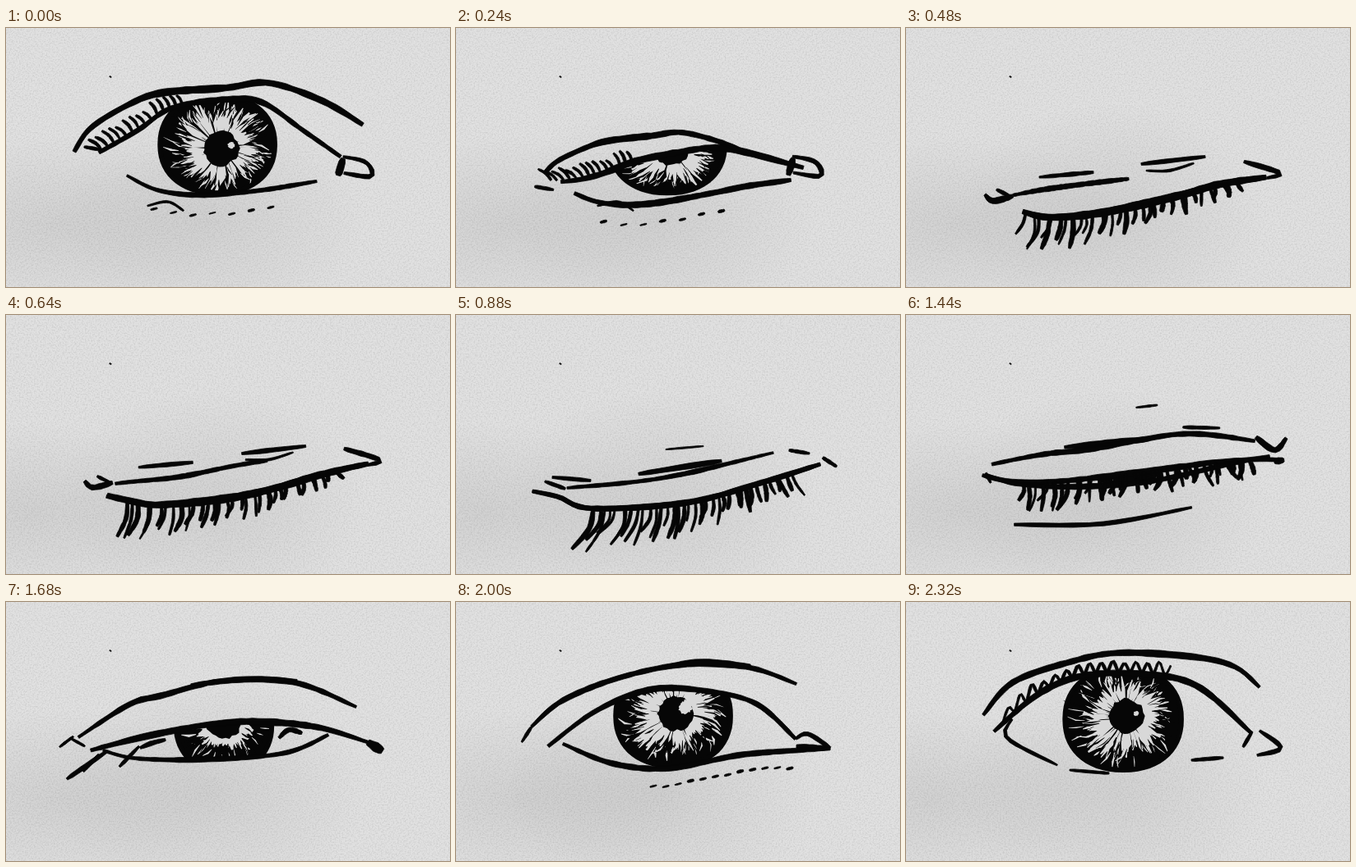
Write an HTML page that moves like this. It is 540 px wide and 316 px high and loops after 2.4 s.

```html
<!DOCTYPE html>
<html lang="en">
<head>
<meta charset="utf-8">
<title>Blinking eye</title>
<style>
html, body { margin: 0; width: 100%; height: 100%; overflow: hidden; background: #dedede; }
svg { display: block; width: 100vw; height: 100vh; }
</style>
</head>
<body>
<svg viewBox="0 0 540 316" preserveAspectRatio="none">
  <defs>
    <radialGradient id="shade"><stop stop-color="#000" stop-opacity=".07"/><stop offset="1" stop-color="#000" stop-opacity="0"/></radialGradient>
    <filter id="grain" x="0" y="0" width="100%" height="100%" color-interpolation-filters="sRGB">
      <feTurbulence id="noise" type="fractalNoise" baseFrequency=".55" numOctaves="2"/>
      <feColorMatrix values="0 0 0 0 0  0 0 0 0 0  0 0 0 0 0  .2 0 0 0 -.08"/>
    </filter>
    <clipPath id="gap"><path id="gapPath"/></clipPath>
  </defs>
  <rect width="540" height="316" fill="#e1e1e1"/>
  <ellipse id="shadow" cx="60" cy="240" rx="210" ry="110" fill="url(#shade)"/>
  <ellipse cx="250" cy="230" rx="190" ry="140" fill="url(#shade)"/>
  <rect width="540" height="316" filter="url(#grain)"/>
  <g id="iris" clip-path="url(#gap)" fill="#060606">
    <path id="disc"/>
    <path id="light" fill="#d8d8d8"/>
    <path id="fibre"/>
    <path id="rim" fill="none" stroke="#060606" stroke-width="6"/>
    <path id="pupil"/>
    <path id="glint" fill="#d8d8d8"/>
  </g>
  <path id="ink" fill="#060606" stroke="#060606" stroke-width=".8" stroke-linejoin="round"/>
</svg>
<script>
const STEP = 80, FRAMES = 30, N = 48;
const $ = id => document.getElementById(id);
const setD = (id, d) => $(id).setAttribute("d", d);
const mix = (a, b, t) => a + (b - a) * t;

// w: widths of crease, lid and lower line.
// folds travel with the lid, corners stay; both are "width x,y x,y ...|width ...".
// lashes, hatch and dashes are grown along the lines by rule.
const poses = [
  { at: 0, ease: 1, w: [8, 6.5, 5.5],
    crease: "83,151 103,122 150,93 190,79 268,73 320,67 385,89 434,118",
    lid: "113,152 160,125 203,97 270,87 312,91 360,124 407,157",
    low: "147,180 185,198 240,204 310,198 378,187",
    iris: { x: 257, y: 142, rx: 72, ry: 61, px: 262, py: 147, glow: .55, axis: 1.3, glint: 4 },
    folds: "4 95,145 118,149",
    corners: "5 410,157 438,164 444,181 411,177|9 410,159 404,180|3 172,217 197,212 216,223",
    hatch: { from: 116, to: 214, n: 14, height: 14 },
    dashes: { from: 180, to: 322, n: 7, drop: 22 } },
  { at: 6, ease: 1, w: [6, 9, 9],
    crease: "130,204 168,197 220,190 271,184",
    lid: "142,224 175,231 240,225 330,205 380,191 438,182",
    folds: "5 162,182 228,176|5 286,166 364,157|3 292,174 320,174 350,165",
    corners: "7 96,203 106,211 130,205|4 110,197 126,205|6 411,163 455,177 439,183",
    lashes: { from: 144, to: 405, n: 32, len: [44, 15], lean: [-12, 6], zig: 5 } },
  { at: 11, ease: 1, w: [5, 6.5, 6.5],
    crease: "135,211 250,199 386,168",
    lid: "93,215 125,222 165,236 280,229 370,205 443,182",
    folds: "6 222,194 323,178|5 262,197 305,189|2 255,164 301,160",
    corners: "5 108,203 133,212|5 117,198 164,202|4 405,165 430,169|5 446,174 463,185",
    lashes: { from: 165, to: 412, n: 36, len: [50, 24], lean: [-22, 12], zig: 5 } },
  { at: 15, ease: 2, w: [6.5, 6.5, 6.5],
    crease: "110,189 220,182 285,171 340,162 424,163",
    lid: "90,200 130,213 200,216 300,206 400,184 458,177",
    folds: "7 193,172 240,167 297,162|3 280,124 306,121|4 337,148 382,149",
    corners: "4 97,192 103,204|7 425,149 448,165 462,150|8 448,179 460,177|5 132,255 240,254 348,234",
    lashes: { from: 140, to: 420, n: 40, len: [35, 23], lean: [-5, 5], zig: 11 } },
  { at: 21, ease: 1, w: [6.5, 7.5, 5.5],
    crease: "88,165 150,125 190,114 260,97 350,98 426,128",
    lid: "103,181 170,164 250,149 310,146 380,153 440,171",
    low: "118,181 160,191 250,192 340,184 392,162",
    iris: { x: 265, y: 150, rx: 60, ry: 58, px: 265, py: 146, glow: .25, axis: .2, glint: 2 },
    folds: "5 225,101 290,93 354,96|4 138,201 162,176|5 163,178 178,172 194,168|6 332,166 344,156 360,160",
    corners: "5 74,216 123,182|4 94,207 113,186|3 65,177 82,164|3 78,166 96,176|12 440,171 458,182" },
  { at: 25, ease: 1, w: [6.5, 6.5, 6.5],
    crease: "92,152 130,120 200,92 280,76 357,80 414,100",
    lid: "112,176 170,133 235,107 300,108 365,124 413,167",
    low: "130,173 190,197 260,203 350,186 455,179",
    iris: { x: 264, y: 139, rx: 72, ry: 63, px: 267, py: 136, glow: .45, axis: 2.3, glint: 8 },
    folds: "7 258,79 300,73 358,78",
    corners: "4 92,152 80,171|5 413,167 428,161 455,178|7 414,176 455,179",
    dashes: { from: 240, to: 406, n: 12, drop: 19 } },
  { at: 29, ease: 1, w: [7.5, 7.5, 0],
    crease: "94,138 130,98 200,73 260,62 350,67 400,79 430,104",
    lid: "107,158 160,113 215,90 290,88 355,103 420,160",
    low: "123,165 185,199 264,214 347,194 385,190",
    iris: { x: 264, y: 143, rx: 73, ry: 64, px: 268, py: 139, glow: .45, axis: 1.8, glint: 3 },
    folds: "",
    corners: "4 129,143 123,166 184,199|4 199,205 247,209|4 347,193 386,190|4 421,158 410,177|5 430,157 456,178 427,187",
    hatch: { from: 118, to: 322, n: 30, height: 13, zig: true } }
];

function rng(seed) {
  let s = seed * 7919 + 17;
  return () => {
    s = (s + 0x6D2B79F5) | 0;
    let r = Math.imul(s ^ s >>> 15, 1 | s);
    r ^= r + Math.imul(r ^ r >>> 7, 61 | r);
    return ((r ^ r >>> 14) >>> 0) / 4294967296;
  };
}

const points = s => s.split(" ").map(p => p.split(",").map(Number));
const strokes = s => s ? s.split("|").map(line => {
  const i = line.indexOf(" ");
  return { w: +line.slice(0, i), pts: points(line.slice(i + 1)) };
}) : [];

// Smooth curve through the points, sampled at equal distances.
function curve(p, n) {
  const dense = [];
  for (let i = 0; i < p.length - 1; i++) {
    const a = p[i - 1] || p[i], b = p[i], c = p[i + 1], d = p[i + 2] || c;
    for (let k = 0; k < 10; k++) {
      const t = k / 10;
      dense.push([0, 1].map(j => b[j] + t / 2 * (c[j] - a[j] +
        t * (2 * a[j] - 5 * b[j] + 4 * c[j] - d[j] + t * (3 * (b[j] - c[j]) + d[j] - a[j])))));
    }
  }
  dense.push(p[p.length - 1]);
  const len = [0];
  for (let i = 1; i < dense.length; i++)
    len.push(len[i - 1] + Math.hypot(dense[i][0] - dense[i - 1][0], dense[i][1] - dense[i - 1][1]));
  const total = len[len.length - 1], out = [];
  for (let i = 0, k = 1; i <= n; i++) {
    const at = total * i / n;
    while (k < len.length - 1 && len[k] < at) k++;
    const t = (at - len[k - 1]) / (len[k] - len[k - 1] || 1);
    out.push([0, 1].map(j => mix(dense[k - 1][j], dense[k][j], t)));
  }
  return out;
}

const polygon = p => "M" + p.map(q => q[0].toFixed(1) + " " + q[1].toFixed(1)).join("L") + "Z";

// Outline of a brush stroke with soft pressure at both ends.
function brush(p, w, rand, tip = .55) {
  const left = [], right = [], n = p.length - 1, phase = rand() * 6;
  p.forEach(([x, y], i) => {
    const a = p[Math.max(0, i - 1)], b = p[Math.min(n, i + 1)];
    const dx = b[0] - a[0], dy = b[1] - a[1], l = Math.hypot(dx, dy) || 1;
    const press = tip + (1 - tip) * Math.sqrt(Math.abs(Math.sin(Math.PI * i / n)));
    const h = w / 2 * press * (.9 + .2 * rand() + .1 * Math.sin(phase + i / 4));
    left.push([x - dy / l * h, y + dx / l * h]);
    right.unshift([x + dy / l * h, y - dx / l * h]);
  });
  return polygon(left.concat(right));
}

function yAt(line, x) {
  let i = 1;
  while (i < line.length - 1 && line[i][0] < x) i++;
  const [a, b] = [line[i - 1], line[i]];
  return mix(a[1], b[1], Math.max(0, Math.min(1, (x - a[0]) / (b[0] - a[0] || 1))));
}

for (const p of poses) {
  p.low = curve(points(p.low || p.lid), N);
  p.lid = curve(points(p.lid), N);
  p.crease = curve(points(p.crease), N);
  p.folds = strokes(p.folds);
  p.corners = strokes(p.corners);
}

function drawIris(v, rand) {
  const square = c => Math.sign(c) * Math.abs(c) ** .9;
  const at = (r, a) => [
    mix(v.px, v.x, r) + v.rx * r * square(Math.cos(a)),
    mix(v.py, v.y, r) + v.ry * r * square(Math.sin(a))
  ];
  const blob = (x, y, r, rough) => polygon(Array.from({ length: 30 }, (_, i) => {
    const k = r * (1 + rough * (rand() - .5)), t = i * Math.PI / 15;
    return [x + k * Math.cos(t), y + k * Math.sin(t)];
  }));
  const ring = r => polygon(Array.from({ length: 60 }, (_, i) => at(r, i * Math.PI / 30)));
  const rays = (count, w, from, to) => {
    let d = "";
    for (let i = 0; i < count; i++) {
      const a = (i + rand()) / count * 2 * Math.PI, bend = (rand() - .3) * .3;
      const r0 = from(a), r1 = to(a, r0);
      d += brush([at(r0, a), at((r0 + r1) / 2, a + bend / 3), at(r1, a + bend)], w * (.5 + rand()), rand, .3);
    }
    return d;
  };
  // Light spreads further along the axis and in a few random clumps.
  const phase = rand() * 6;
  const reach = a => .42 + v.glow * (.15 + .35 * Math.abs(Math.cos(a - v.axis)) +
    .12 * Math.sin(5 * a + phase) + .35 * rand());
  setD("disc", ring(1));
  setD("light", rays(85, 4.5, () => .27, a => Math.min(.92, reach(a))) +
    rays(120 * v.glow, 2, () => .5 + .25 * rand(), (a, r) => Math.min(.94, r + .1 + .2 * rand())));
  setD("fibre", rays(60, 2, () => .4 + .3 * rand(), (a, r) => r + .15 + .2 * rand()));
  setD("rim", ring(.97));
  setD("pupil", blob(v.px, v.py, 21, .18));
  setD("glint", blob(v.px + 12, v.py - v.glint, v.glint, .4));
}

// Lashes hang from the lid, shorter and leaning outwards to the right.
function lashStrokes(r, lid, rand) {
  return Array.from({ length: r.n }, (_, i) => {
    const t = (i + .8 * rand()) / r.n, x = mix(r.from, r.to, t), y = yAt(lid, x);
    const len = mix(r.len[0], r.len[1], t) * (.6 + .5 * rand());
    const lean = mix(r.lean[0], r.lean[1], t) + r.zig * (i % 2 ? 1 : -1) * rand();
    return { w: 2.5 + 3.5 * rand(), pts: [[x, y], [x + lean * .3 + 3 * rand(), y + len / 2], [x + lean, y + len]] };
  });
}

// Short strokes, or one zigzag, standing on the lid.
function hatchStrokes(r, lid, rand) {
  const foot = Array.from({ length: r.n }, (_, i) => {
    const x = mix(r.from, r.to, i / (r.n - 1));
    return [x, yAt(lid, x) - 2];
  });
  if (r.zig) return [{ w: 3.5, pts: foot.map(([x, y], i) => [x, y - (i % 2) * r.height * (.7 + .5 * rand())]) }];
  return foot.map(([x, y], i) => {
    const h = r.height * (.6 + .5 * rand()), back = mix(16, 6, i / r.n);
    return { w: 3.5, pts: [[x, y], [x - back * .4, y - h * .6], [x - back, y - h]] };
  });
}

function dashStrokes(r, low, rand) {
  return Array.from({ length: r.n }, (_, i) => {
    const x = mix(r.from, r.to, i / (r.n - 1)), y = yAt(low, x) + r.drop + 3 * rand();
    return { w: 1.5 + 2 * rand(), pts: [[x - 4, y + 1], [x + 4, y - 1]] };
  });
}

function draw(frame) {
  let i = poses.length - 1;
  while (poses[i].at > frame) i--;
  const a = poses[i], b = poses[i + 1] || a;
  const t = a === b ? 0 : ((frame - a.at) / (b.at - a.at)) ** a.ease;
  const near = t <= .5 ? a : b;
  const rand = rng(frame + 1);
  const loose = t ? 1.6 : 0;

  // Redrawn by hand each step: a slow wobble between the main poses.
  const blend = key => {
    const phase = rand() * 6.28, sway = (rand() - .5) * loose;
    return a[key].map((p, k) => [
      mix(p[0], b[key][k][0], t) + sway,
      mix(p[1], b[key][k][1], t) + loose * Math.sin(phase + k / 6) * .6
    ]);
  };
  const crease = blend("crease"), lid = blend("lid"), low = blend("low");
  const w = a.w.map((n, k) => mix(n, b.w[k], t));
  const mean = line => line.reduce((s, p) => s + p[1], 0) / line.length;

  let ink = brush([[126, 59], [128, 60]], 2, rand);
  ink += brush(crease, w[0], rand) + brush(lid, w[1], rand);
  if (w[2] > .5) ink += brush(low, w[2], rand);
  const add = (list, dy = 0) => list.forEach(s => {
    const jx = (rand() - .5) * loose, jy = (rand() - .5) * loose + dy;
    const p = s.pts.map(q => [q[0] + jx, q[1] + jy]);
    ink += brush(curve(p, p.length * 4), s.w, rand);
  });
  add(near.folds, mean(lid) - mean(near.lid));
  add(near.corners);
  if (near.lashes) add(lashStrokes(near.lashes, lid, rand));
  if (near.hatch) add(hatchStrokes(near.hatch, lid, rand));
  if (near.dashes) add(dashStrokes(near.dashes, low, rand));
  setD("ink", ink);

  const from = a.iris || b.iris, to = b.iris || from;
  $("iris").style.display = from && mean(low) - mean(lid) > 3 ? "" : "none";
  if (from) {
    setD("gapPath", polygon(lid.concat(low.slice().reverse())));
    const eye = {};
    for (const key in from) eye[key] = mix(from[key], to[key], t);
    drawIris(eye, rand);
  }
  $("noise").setAttribute("seed", 1 + frame % 3);
  $("shadow").setAttribute("cx", 60 + 30 * Math.sin(frame * 2.1));
}

let shown = -1;
function tick() {
  const frame = Math.floor(performance.now() / STEP) % FRAMES;
  if (frame !== shown) draw(shown = frame);
  requestAnimationFrame(tick);
}
tick();
</script>
</body>
</html>
```
